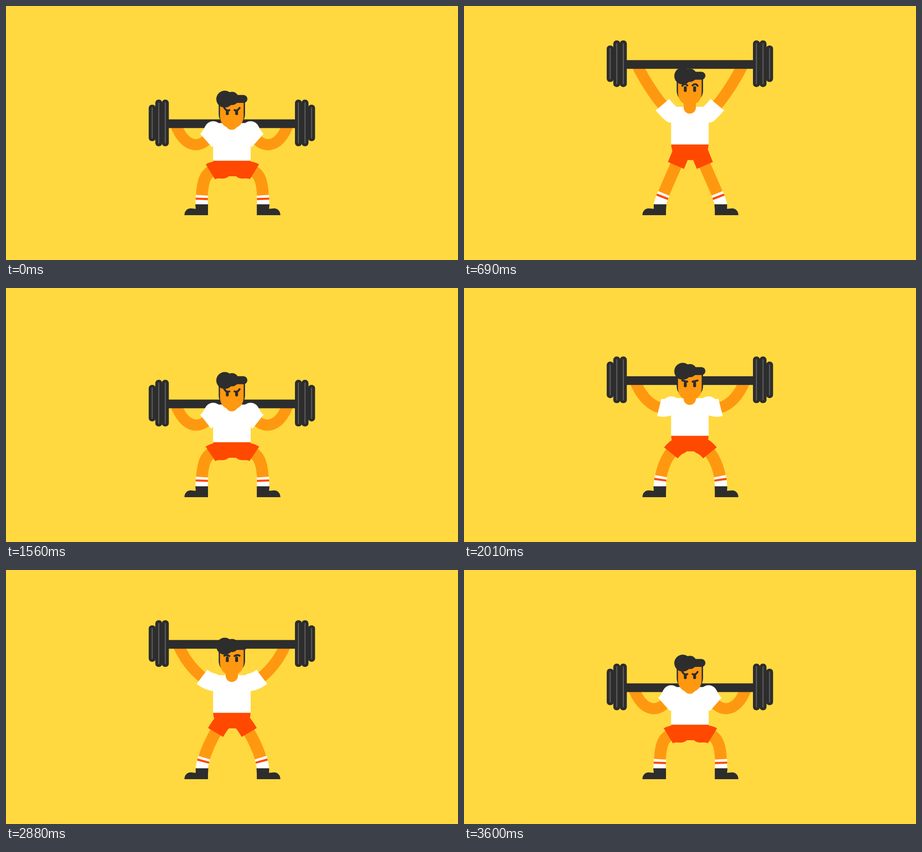
An HTML page with a canvas that plays this animation: 998x561 px, repeating every 3630 ms.

```html
<!DOCTYPE html>
<html lang="en">
<head>
<meta charset="utf-8">
<title>Weightlifter</title>
<style>
  html, body { margin: 0; width: 100%; height: 100%; overflow: hidden; background: #ffd93f; }
  canvas { display: block; width: 998px; height: 561px; }
</style>
</head>
<body>
<canvas id="stage"></canvas>
<script>
const W = 998, H = 561, LOOP = 3630, HALF = 900;
const BG = '#ffd93f', SKIN = '#ff9811', RED = '#ff4800', DARK = '#2d2d2d', SHINE = '#5c5c5c', WHITE = '#fff';
const BODY_X = 498.75, LEGS_X = 499.9;

const canvas = document.getElementById('stage');
const dpr = window.devicePixelRatio || 1;
canvas.width = W * dpr;
canvas.height = H * dpr;
const ctx = canvas.getContext('2d');
ctx.scale(dpr, dpr);

// Cubic easing with handles (.35, 0) and (.01, 1)
function ease(x) {
  let lo = 0, hi = 1;
  for (let i = 0; i < 30; i++) {
    const s = (lo + hi) / 2, r = 1 - s;
    const at = 3 * r * r * s * 0.35 + 3 * r * s * s * 0.01 + s * s * s;
    if (at < x) lo = s; else hi = s;
  }
  return lo * lo * (3 - 2 * lo);
}

// 0 = squat, 1 = bar overhead
function liftAt(ms) {
  const t = (ms % LOOP) % (2 * HALF);
  return t < HALF ? ease(t / HALF) : 1 - ease(t / HALF - 1);
}

function bothSides(axis, draw) {
  draw();
  ctx.save();
  ctx.translate(2 * axis, 0);
  ctx.scale(-1, 1);
  draw();
  ctx.restore();
}

function fill(color, d, y = 0) {
  ctx.save();
  ctx.translate(0, y);
  ctx.fillStyle = color;
  ctx.fill(new Path2D(d));
  ctx.restore();
}

function disc(color, x, y, r) {
  ctx.fillStyle = color;
  ctx.beginPath();
  ctx.arc(x, y, r, 0, 2 * Math.PI);
  ctx.fill();
}

function pill(color, x, y, w, h, r) {
  ctx.fillStyle = color;
  ctx.beginPath();
  ctx.roundRect(x, y, w, h, r);
  ctx.fill();
}

// Strokes the stretch [from, to] of a cubic, measured along its length
function limb(pts, color, width, from = 0, to = 400) {
  const [a, b, c, d] = pts;
  ctx.strokeStyle = color;
  ctx.lineWidth = width;
  ctx.lineCap = 'butt';
  ctx.setLineDash([to - from, 1000]);
  ctx.lineDashOffset = 0;
  if (from) {
    ctx.setLineDash([0, from, to - from, 1000]);
  }
  ctx.beginPath();
  ctx.moveTo(...a);
  ctx.bezierCurveTo(...b, ...c, ...d);
  ctx.stroke();
  ctx.setLineDash([]);
}

function plate(x, y, h) {
  pill(DARK, x - 7.7, y, 15.4, h, 7.2);
  pill(SHINE, x - 1.2, y + 6, 2.4, h - 12, 1.2);
}

function barbell(y) {
  ctx.fillStyle = DARK;
  ctx.fillRect(355, y + 43.6, 287.5, 19.2);
  bothSides(BODY_X, () => {
    plate(322.8, y + 11.2, 80.6);
    plate(337.3, y, 103);
    plate(351.8, y, 103);
  });
}

function leg(p, waist) {
  const down = [
    [478.5, waist + 20.5],
    [440 + 26.7 * p, 358 + 2.1 * p],
    [432 + 5.3 * p, 382 + 35.3 * p],
    [432, 440]
  ];
  const up = [...down].reverse();
  const sock = 22 + 6 * p;
  limb(down, SKIN, 26);
  limb(up, WHITE, 27, 0, sock);
  limb(up, RED, 27, sock - 10.3, sock - 5.7);
  limb(down, RED, 38.6, 0, 28);
  disc(RED, ...down[0], 19.3);
  fill(DARK, `M394 462C394 453 400 447 408 447C412 447 415 448 419 448L${418 + p} 438H${446 + p}L446 450V462Z`);
}

function head(y, p) {
  fill(SKIN, 'M472.5 18V55C472.5 72 482 82 498.5 83C515 82 524.7 72 524.7 55V18Z', y);
  disc(DARK, 483, y + 18.7, 18.7);
  disc(DARK, 499, y + 17.2, 14.6);
  pill(DARK, 490, y + 9.4, 43, 17.6, 8.8);
  bothSides(498.9, () => {
    pill(DARK, 485.4, y + 41.5, 6.4, 12.5, 3);
    ctx.strokeStyle = DARK;
    ctx.lineWidth = 4.2;
    ctx.lineCap = 'round';
    ctx.beginPath();
    ctx.moveTo(482, y + 38 + 2.5 * p);
    ctx.quadraticCurveTo(487, y + 46 - 13 * p, 493.2, y + 43 - 3.5 * p);
    ctx.stroke();
  });
}

function draw(p) {
  const bar = 206.8 - 133.8 * p;
  const waist = 341.5 - 36.6 * p;
  const hair = 187 - 52.3 * p;
  const arm = [
    [457.5, waist - 67.5],
    [437 - 4.3 * p, 320 - 105.9 * p],
    [394 + 8.6 * p, 318 - 149.7 * p],
    [374 + 7.5 * p, bar + 53]
  ];

  ctx.fillStyle = BG;
  ctx.fillRect(0, 0, W, H);

  bothSides(BODY_X, () => limb(arm, SKIN, 24.6));
  barbell(bar);
  pill(DARK, 469.6, hair + 14, 58.2, 62, [4, 4, 24, 24]);

  bothSides(LEGS_X, () => leg(p, waist));
  fill(RED, 'M457.5 0C458 14 464 30 488 34.5H509C533 30 539.5 14 540 0Z', waist);

  ctx.fillStyle = WHITE;
  ctx.fillRect(457.3, waist - 83, 82.9, 83);
  bothSides(BODY_X, () => {
    limb(arm, WHITE, 39, 0, 28);
    disc(WHITE, ...arm[0], 19.5);
  });

  pill(SKIN, 485, waist - 98, 27, 30, [0, 0, 13.5, 13.5]);
  head(hair, p);
}

function tick() {
  draw(liftAt(performance.now()));
  requestAnimationFrame(tick);
}
tick();
</script>
</body>
</html>
```
